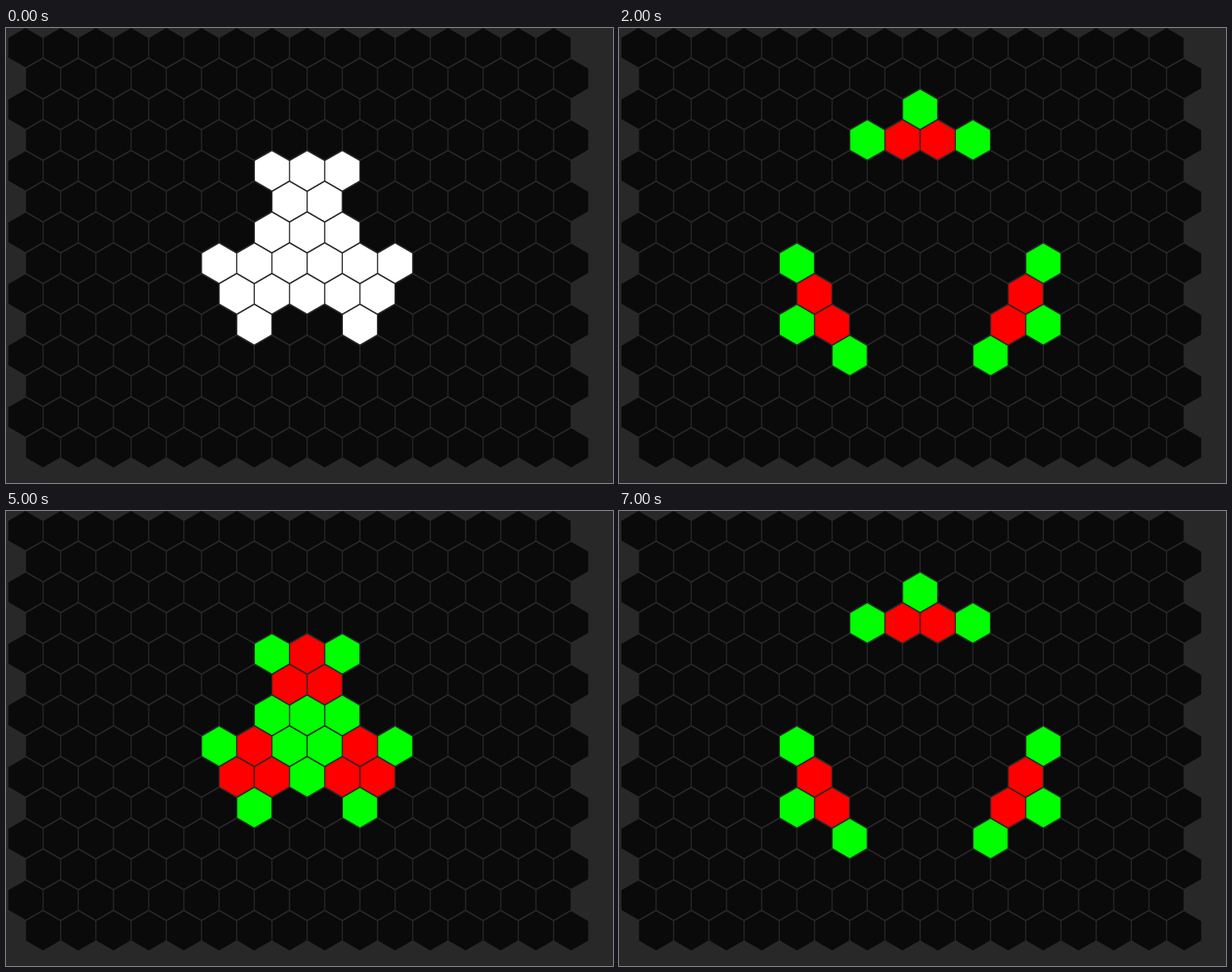
An HTML page with a canvas that plays this animation: 800x600 px, repeating every 8 s.

```html
<!DOCTYPE html>
<html lang="en">
<head>
<meta charset="utf-8">
<title>Hexagonal life</title>
<style>
  html, body { margin: 0; width: 100%; height: 100%; overflow: hidden; background: #282828; }
  canvas { display: block; }
</style>
</head>
<body>
<canvas id="stage" width="800" height="600"></canvas>
<script>
const COLS = 16, ROWS = 14, STEPS = 8, STEP_MS = 1000;
const DX = 46.4, DY = 40.59, X0 = 25.65, Y0 = 25.95, R = 25.9;
const COLOR = { dead: '#0a0a0a', seed: '#ffffff', born: '#00ff00', kept: '#ff0000' };

const ctx = document.getElementById('stage').getContext('2d');

// Live columns of the first generation, by row
const SEED = {
  4: [7, 8, 9],
  5: [7, 8],
  6: [7, 8, 9],
  7: [5, 6, 7, 8, 9, 10],
  8: [6, 7, 8, 9, 10],
  9: [6, 9]
};

function makeGrid(cell) {
  return Array.from({ length: ROWS }, (_, r) =>
    Array.from({ length: COLS }, (_, c) => cell(r, c)));
}

function countNeighbours(grid, r, c) {
  const left = c - 1 + r % 2;
  const around = [
    [r, c - 1], [r, c + 1],
    [r - 1, left], [r - 1, left + 1],
    [r + 1, left], [r + 1, left + 1]
  ];
  return around.filter(([y, x]) => grid[y]?.[x] && grid[y][x] !== 'dead').length;
}

// A cell lives in the next generation with exactly two live neighbours
function evolve(grid) {
  return makeGrid((r, c) => {
    if (countNeighbours(grid, r, c) !== 2) return 'dead';
    return grid[r][c] === 'dead' ? 'born' : 'kept';
  });
}

const generations = [makeGrid((r, c) => SEED[r]?.includes(c) ? 'seed' : 'dead')];
while (generations.length < STEPS) generations.push(evolve(generations.at(-1)));

function drawHex(x, y, color) {
  ctx.beginPath();
  for (let i = 0; i < 6; i++) {
    const a = Math.PI / 3 * i - Math.PI / 2;
    ctx.lineTo(x + R * Math.cos(a), y + R * Math.sin(a));
  }
  ctx.fillStyle = color;
  ctx.fill();
}

function draw(grid) {
  ctx.fillStyle = '#282828';
  ctx.fillRect(0, 0, 800, 600);
  grid.forEach((row, r) => row.forEach((state, c) =>
    drawHex(X0 + DX * (c + r % 2 / 2), Y0 + DY * r, COLOR[state])));
}

const start = performance.now();
let shown = -1;

function tick() {
  const step = Math.floor((performance.now() - start) / STEP_MS) % STEPS;
  if (step !== shown) {
    shown = step;
    draw(generations[step]);
  }
  requestAnimationFrame(tick);
}
tick();
</script>
</body>
</html>
```
